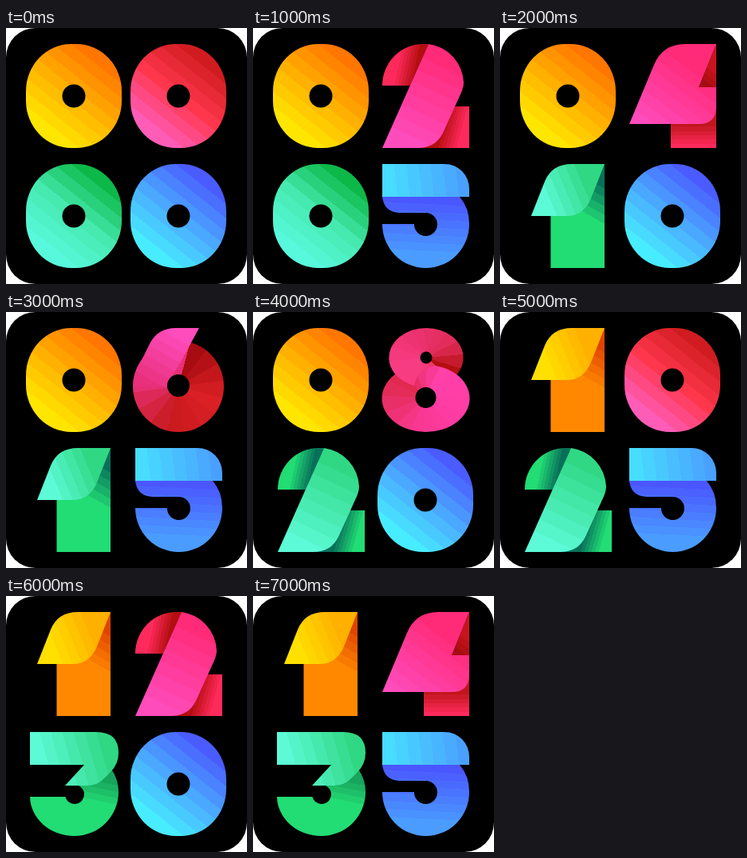
Recreate the animation shown at these times as an HTML page with a canvas. Size 302 by 320 pixels, loop 8000 ms.

```html
<!DOCTYPE html>
<html lang="en">
<head>
<meta charset="utf-8">
<title>Ribbon clock</title>
<style>
  html, body { margin: 0; width: 100%; height: 100%; overflow: hidden; background: #fff; }
  canvas { display: block; }
</style>
</head>
<body>
<canvas id="stage" width="302" height="320"></canvas>
<script>
const ctx = document.getElementById('stage').getContext('2d');

// zero: bottom-left to top-right; light/mid: ribbon front; base/dark: ribbon back
const palettes = [
  { x: 25, y: 20, zero: ['#ffe600', '#ffb000', '#ff7600'], light: '#ffe000', mid: '#ffb000', base: '#ff8800', dark: '#e04400' },
  { x: 156, y: 20, zero: ['#ff5cb8', '#ff364c', '#d01c20'], light: '#ff4cbc', mid: '#ff2a78', base: '#ff2a5c', dark: '#b40e10' },
  { x: 25, y: 170, zero: ['#58f8dc', '#46eab0', '#0cb848'], light: '#5cfad6', mid: '#30d884', base: '#22dc74', dark: '#08705a' },
  { x: 156, y: 170, zero: ['#48ecff', '#4aa8ff', '#4a5cff'], light: '#48dcff', mid: '#4aa0ff', base: '#4a9cff', dark: '#4a56ff' }
];

const channels = hex => [1, 3, 5].map(i => parseInt(hex.slice(i, i + 2), 16));

function colorAt(colors, t) {
  const p = t * (colors.length - 1);
  const i = Math.min(Math.floor(p), colors.length - 2);
  const a = channels(colors[i]), b = channels(colors[i + 1]);
  return `rgb(${a.map((v, k) => Math.round(v + (b[k] - v) * (p - i)))})`;
}

// Fills a gradient with flat bands instead of a smooth blend
function banded(gradient, colors, count) {
  for (let i = 0; i < count; i++) {
    const color = colorAt(colors, i / (count - 1));
    gradient.addColorStop(i / count, color);
    gradient.addColorStop((i + 1) / count, color);
  }
  return gradient;
}

const linear = (x1, y1, x2, y2, colors, count = 8) =>
  banded(ctx.createLinearGradient(x1, y1, x2, y2), colors, count);
const conic = (degrees, x, y, colors, count = 16) =>
  banded(ctx.createConicGradient(degrees * Math.PI / 180, x, y), colors, count);

function shape(path, fill) {
  ctx.fillStyle = fill;
  ctx.fill(new Path2D(path));
}

function oval(x, y, rx, ry = rx, fill = '#000') {
  ctx.fillStyle = fill;
  ctx.beginPath();
  ctx.ellipse(x, y, rx, ry, 0, 0, Math.PI * 2);
  ctx.fill();
}

const digits = {
  0({ zero }) {
    ctx.fillStyle = linear(20, 110, 96, 14, zero, 9);
    ctx.beginPath();
    ctx.roundRect(0, 0, 120, 130, [{ x: 57, y: 59 }]);
    ctx.fill();
    oval(60, 65, 14.5);
  },
  1({ light, mid, base, dark }) {
    shape('M106 0V130H38.5V60Z', linear(106, 20, 78, 70, [dark, base], 6));
    shape('M14 65L31 22Q40 0 65 0H106L89 43Q80 65 58 65Z', linear(28, 50, 90, 24, [light, mid], 6));
  },
  2({ light, mid, base, dark }) {
    shape('M6 52A51 52 0 0 1 57 0H64L41 52Z', linear(22, 28, 50, 34, [base, dark], 7));
    shape('M94 78H115V130H50Z', linear(78, 108, 107, 116, [dark, base], 7));
    shape('M64 0A51 51 0 0 1 108 48Q108 55 103 65L82 111Q73 130 50 130H6Z',
      linear(24, 124, 78, 10, [light, mid]));
  },
  3({ light, mid, base }) {
    shape('M5 81H49.4A12 12 0 1 0 61 66L108 48Q116 60 116 75A55.5 55 0 0 1 60.5 130A55.5 50 0 0 1 5 81Z',
      linear(100, 56, 92, 94, ['#18a45c', base], 5));
    shape('M5 0H88Q116 0 116 26Q116 40 106 50L98 58Q90 67 75 67H49L73 41H5Z',
      linear(14, 40, 106, 14, [light, mid], 7));
  },
  4({ light, mid, base, dark }) {
    shape('M58 99V130H115V70H90Z', linear(0, 98, 0, 130, ['#c0161c', base], 6));
    shape('M115 0L93 54H115Z', linear(98, 52, 116, 30, ['#a60c10', '#c8141c'], 4));
    shape('M6 100L37 26Q48 0 76 0H115L93 54H115V78Q115 100 93 100Z',
      linear(20, 104, 84, 18, [light, mid]));
  },
  5({ light, mid, base, dark }) {
    shape('M6 41H103Q115 55 115 75A54.5 55 0 0 1 6 75H46A14.5 14.5 0 1 0 60 61H28Q8 60 6 41Z',
      linear(62, 40, 58, 118, [dark, base]));
    shape('M6 0H84A31 31 0 0 1 115 31V41H6Z', linear(8, 24, 114, 12, [light, mid], 7));
  },
  6({ light }) {
    oval(60, 73, 57, 57, conic(-75, 60, 73, ['#a60c10', '#dc2026', '#c81a1e', '#e83078', '#e83078']));
    shape('M3 73Q3 58 13 42L25 18Q35 0 57 0H86L62 44Q48 66 46 73Z',
      linear(66, 4, 24, 78, [light, '#e8307c'], 7));
    oval(60, 72, 14);
  },
  8({ dark }) {
    const upper = conic(40, 61, 37, ['#f03868', '#f83c80', '#f83c84', '#f03474', '#e83068', '#e02c58', dark]);
    oval(61, 37, 46.5, 37, upper);
    oval(60.5, 88, 55, 42, conic(205, 60, 87, ['#e02850', '#ff40a8', '#ff3ca4', '#f83890', '#e42c58']));
    shape('M14.5 37A46.5 37 0 0 0 46 72Q50 48 80 46L61 37Z', upper);
    oval(61, 37, 7.5);
    oval(60.5, 87, 13);
  }
};

function draw() {
  const step = Math.floor(performance.now() % 8000 / 1000);
  const pad = n => String(n).padStart(2, '0');
  const text = pad(step * 2) + pad(step * 5);

  ctx.clearRect(0, 0, 302, 320);
  ctx.fillStyle = '#000';
  ctx.beginPath();
  ctx.roundRect(0, 0, 302, 320, 37);
  ctx.fill();

  palettes.forEach((palette, i) => {
    ctx.save();
    ctx.translate(palette.x, palette.y);
    digits[text[i]](palette);
    ctx.restore();
  });
  requestAnimationFrame(draw);
}
draw();
</script>
</body>
</html>
```
